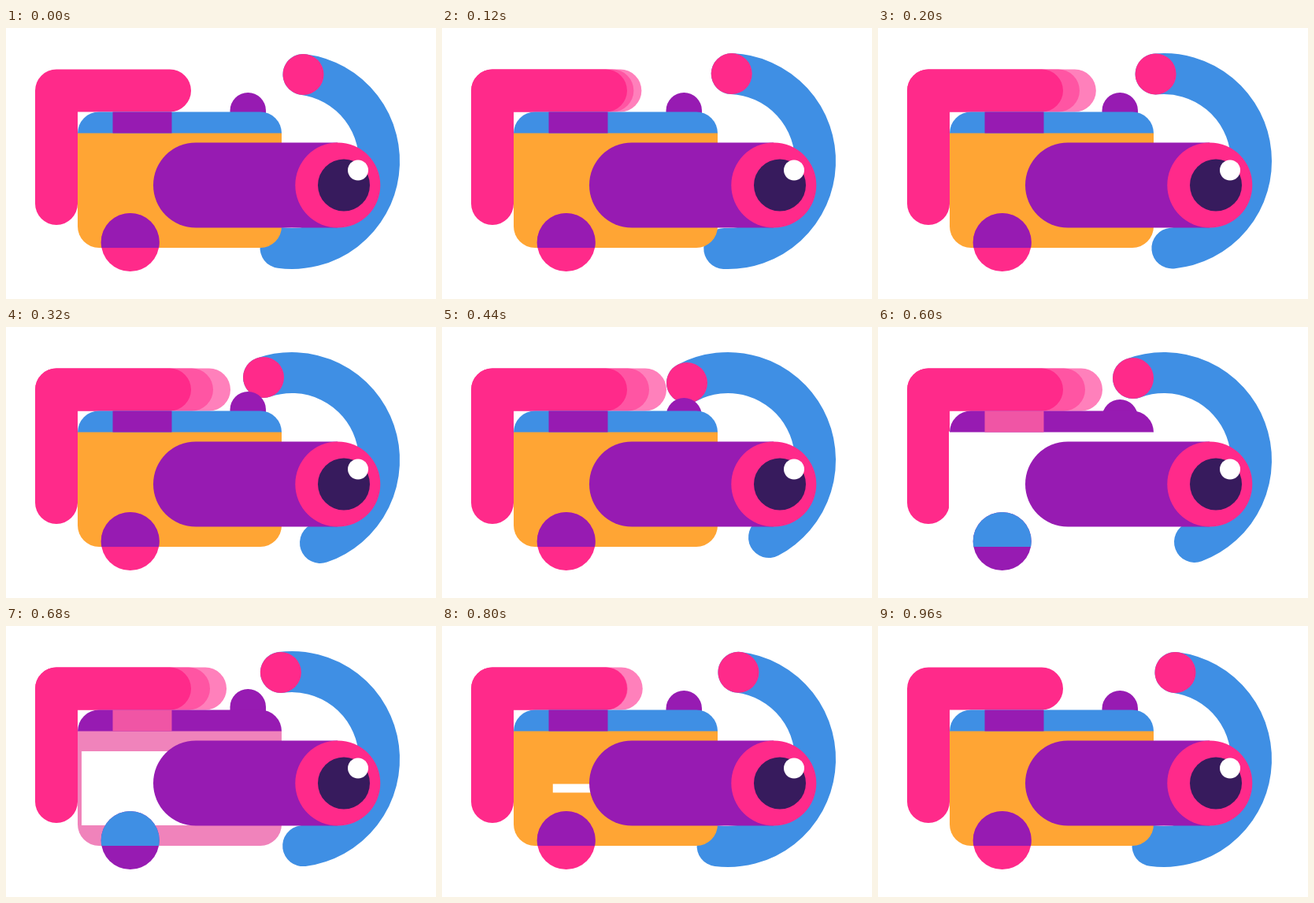
Recreate the animation shown at these times as an HTML page with a canvas. Size 546 by 344 pixels, loop 1000 ms.

```html
<!DOCTYPE html>
<html>
<head>
<meta charset="utf-8">
<title>Camera</title>
<style>
html, body { margin: 0; height: 100%; overflow: hidden; background: #fff; }
canvas { display: block; }
</style>
</head>
<body>
<canvas width="546" height="344"></canvas>
<script>
const ctx = document.querySelector('canvas').getContext('2d');
const LOOP = 1000, STEP = 40;
const PINK = '#ff2a8a', ORANGE = '#ffa534', PURPLE = '#971bb2', BLUE = '#3f8fe4',
      DARK = '#371b5d', WHITE = '#fff';

const progress = (t, a, b) => Math.min(1, Math.max(0, (t - a) / (b - a)));
const sine = u => (1 - Math.cos(Math.PI * u)) / 2;
const power = n => u => u < .5 ? (2 * u) ** n / 2 : 1 - (2 - 2 * u) ** n / 2;
const quad = power(2), cubic = power(3);

function circle(x, y, r, color) {
  ctx.fillStyle = color;
  ctx.beginPath();
  ctx.arc(x, y, r, 0, 2 * Math.PI);
  ctx.fill();
}

function box(x, y, w, h, color, radii = 0) {
  ctx.fillStyle = color;
  ctx.beginPath();
  ctx.roundRect(x, y, w, h, radii);
  ctx.fill();
}

function stroke(width, color, trace) {
  ctx.lineWidth = width;
  ctx.strokeStyle = color;
  ctx.lineCap = ctx.lineJoin = 'round';
  ctx.beginPath();
  trace();
  ctx.stroke();
}

// Half ring with a pink ball at its upper end
function drawFinger(t) {
  const swing = sine(progress(t, 0, 494)) - sine(progress(t, 494, 826));
  const top = (7.5 - 36.5 * swing - 90) * Math.PI / 180;
  stroke(52, BLUE, () => ctx.arc(363, 169, 111, top, top + Math.PI));
  circle(363 + 111 * Math.cos(top), 169 + 111 * Math.sin(top), 26, PINK);
}

function drawButton(t) {
  const y = 82 + 10 * sine(progress(t, 340, 480))
    - 12 * sine(progress(t, 600, 680)) + 2 * sine(progress(t, 680, 800));
  box(284.5, y, 45.5, 125 - y, PURPLE, [22.7, 22.7, 0, 0]);
}

function drawArm(t) {
  const far = 50 * (quad(progress(t, 0, 280)) - quad(progress(t, 600, 960)));
  const near = 28 * (quad(progress(t, 0, 310)) - cubic(progress(t, 600, 843)));
  const bar = (end, color) => stroke(54, color, () => {
    ctx.moveTo(64, 79.5);
    ctx.lineTo(208 + end, 79.5);
  });
  if (far > 0) bar(far, '#ff80bb');
  if (near > 0) bar(near, '#ff55a3');
  stroke(54, PINK, () => {
    ctx.moveTo(64, 223);
    ctx.lineTo(64, 79.5);
    ctx.lineTo(208, 79.5);
  });
}

function drawBody(t) {
  const flash = t >= 600 && t < 720;
  box(91, 133, 259, 146, flash ? '#f083bb' : ORANGE, [0, 0, 27, 27]);

  // White window that closes evenly from all sides
  const w = Math.min(129.5, 124.5 - .373 * (t - 680));
  const h = Math.min(73, 47 - .346 * (t - 680));
  if (t >= 600 && h > 0) {
    const full = h === 73 ? 1 : 0;
    box(220.5 - w - full, 206 - h - full * .5, 2 * (w + full), 2 * (h + full), WHITE);
  }

  box(91, 106.5, 259, 27, flash ? PURPLE : BLUE, [27, 27, 0, 0]);
  box(135.5, 106.5, 75, 27, flash ? '#f055a5' : PURPLE);

  circle(157.7, 272, 37, flash ? PURPLE : PINK);
  ctx.save();
  ctx.beginPath();
  ctx.rect(110, 225, 100, 54);
  ctx.clip();
  circle(157.7, 272, 37, flash ? BLUE : PURPLE);
  ctx.restore();
}

function drawLens() {
  box(187, 145.5, 234, 108, PURPLE, [54, 0, 0, 54]);
  circle(421.3, 199.5, 54, PINK);
  circle(429, 199.5, 33, DARK);
  circle(447, 180.5, 13, WHITE);
}

function frame() {
  const t = Math.floor(performance.now() % LOOP / STEP) * STEP;
  box(0, 0, 546, 344, WHITE);
  drawFinger(t);
  drawButton(t);
  drawArm(t);
  drawBody(t);
  drawLens();
  requestAnimationFrame(frame);
}
frame();
</script>
</body>
</html>
```
